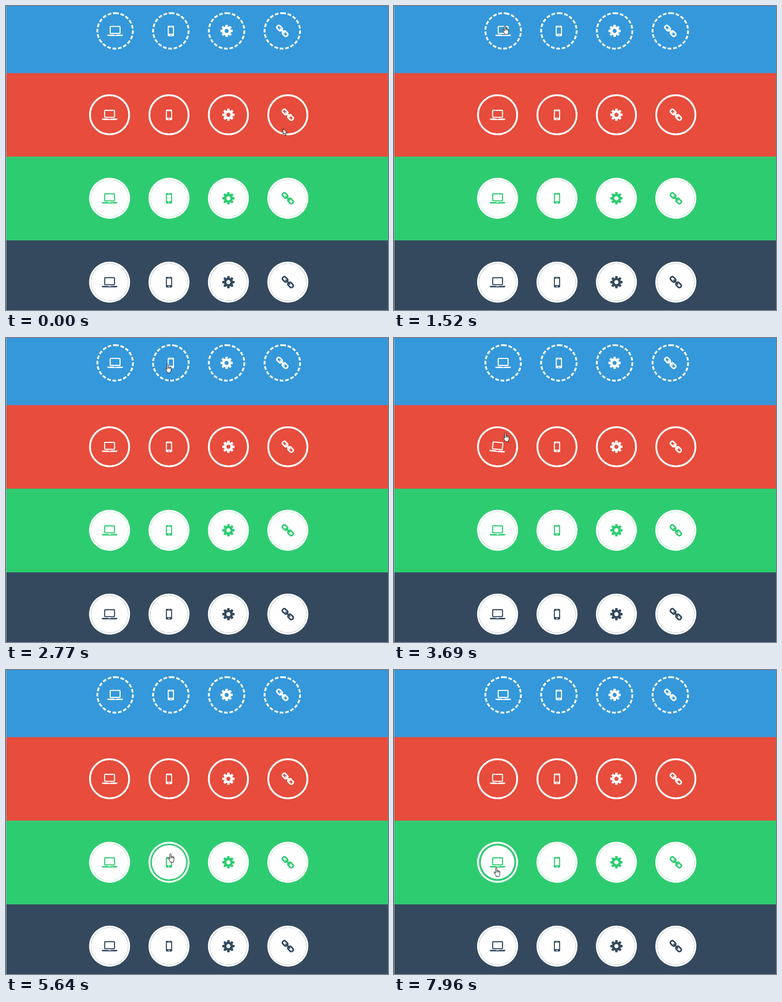
Animation, 839 px wide and 668 px high, one loop 7990 ms. Source, as an HTML page:

```html
<!DOCTYPE html>
<html lang="en">
<head>
<meta charset="utf-8">
<title>Icon hover effects</title>
<style>
  html, body { margin: 0; width: 100%; height: 100%; overflow: hidden; }
  svg { display: block; width: 100%; height: 100%; }
</style>
</head>
<body>
<svg id="stage" viewBox="0 0 839 668">
  <defs>
    <g id="laptop">
      <rect x="-10.8" y="-9.8" width="21.6" height="15.4" rx="1.6" fill="none" stroke="currentColor" stroke-width="2.4"/>
      <path d="M-17 8.2H-3.2L-2.4 9.2H2.4L3.2 8.2H17V9.6Q17 11.4 14.6 11.4H-14.6Q-17 11.4 -17 9.6Z" fill="currentColor"/>
    </g>
    <g id="phone">
      <path fill="currentColor" fill-rule="evenodd" d="M-4.8-11.5H4.8Q6.9-11.5 6.9-9.4V9.6Q6.9 11.8 4.8 11.8H-4.8Q-6.9 11.8-6.9 9.6V-9.4Q-6.9-11.5-4.8-11.5ZM-4.6-7.8V6.4H4.6V-7.8ZM-1.3 8.2V10.2H1.3V8.2ZM-2-10.1V-9.3H2V-10.1Z"/>
    </g>
    <g id="gear">
      <circle r="7.2" fill="none" stroke="currentColor" stroke-width="5.4"/>
    </g>
    <g id="link">
      <g transform="rotate(45)" fill="none" stroke="currentColor" stroke-width="3.4">
        <rect x="-14.9" y="-4.1" width="12.6" height="8.2" rx="3.2"/>
        <rect x="2.3" y="-4.1" width="12.6" height="8.2" rx="3.2"/>
        <path d="M-6 0H6" stroke-width="3.2" stroke-linecap="round"/>
      </g>
    </g>
  </defs>
  <g id="bands"></g>
  <g id="buttons"></g>
  <path d="M.5 0V668" stroke="#a8a8a8"/>
  <g id="arrow" fill="#fff" stroke="#000" stroke-linejoin="round">
    <path d="M.5 .5V13.2L3.4 10.6L5.3 15.2L7.4 14.3L5.5 9.9H9.6Z"/>
  </g>
  <g id="hand" fill="#fff" stroke="#000" stroke-linejoin="round">
    <path d="M-.8 12.5V2C-.8 0 2 0 2 2V7.5C2 6 4.4 6 4.4 7.8C4.4 6.4 6.6 6.6 6.6 8.4C6.6 7.2 8.5 7.4 8.5 9.3V13.5C8.5 15.5 7.3 16.5 7.3 19.5H.3C.3 17-1.5 15.5-2.5 14L-4.3 11.2C-5 9.8-3.2 9-2.2 10.3Z"/>
    <path d="M2 7.5V10.8M4.4 7.8V10.8M6.6 8.4V10.8" fill="none"/>
  </g>
</svg>
<script>
const LOOP = 7990, START = 300, SPIN = 360 / 9000, FADE = 200;
const $ = id => document.getElementById(id);

function add(parent, tag, attrs) {
  const el = document.createElementNS('http://www.w3.org/2000/svg', tag);
  for (const k in attrs) el.setAttribute(k, attrs[k]);
  return parent.appendChild(el);
}

const icons = ['laptop', 'phone', 'gear', 'link'];
const rows = [
  { top: 0, color: '#3498db', x: 239.7, gap: 122.4, y: 54.7, r: 41, kind: 'dashed' },
  { top: 147.5, color: '#e74c3c', x: 227.5, gap: 130.5, y: 239, r: 45, kind: 'ring' },
  { top: 331, color: '#2ecc71', x: 227.5, gap: 130.5, y: 422.5, r: 45, kind: 'disc' },
  { top: 515, color: '#34495e', x: 227.5, gap: 130.5, y: 606.8, r: 45, kind: 'disc' }
];

for (let a = 0; a < 360; a += 45)
  add($('gear'), 'rect', {
    x: -2.7, y: -13.4, width: 5.4, height: 5.4, rx: 0.8,
    fill: 'currentColor', transform: `rotate(${a})`
  });

// The moving part is the dashed ring, the whole button or the inner disc.
const builders = {
  dashed(g) {
    const part = add(g, 'g', {});
    add(part, 'circle', {
      r: 39, fill: 'none', stroke: '#fff', 'stroke-width': 4,
      'stroke-dasharray': '8 4', transform: 'rotate(-90)'
    });
    return part;
  },
  ring(g) {
    const part = add(g, 'g', {});
    add(part, 'circle', { r: 43, fill: 'none', stroke: '#fff', 'stroke-width': 4 });
    return part;
  },
  disc(g, color) {
    add(g, 'circle', { r: 45, fill: '#fff' });
    add(g, 'circle', { r: 41, fill: color });
    return add(g, 'circle', { r: 40.8, fill: '#fff' });
  }
};

const buttons = rows.flatMap(row => {
  add($('bands'), 'rect', { x: 0, y: row.top, width: 839, height: 668 - row.top, fill: row.color });
  return icons.map((icon, i) => {
    const x = row.x + i * row.gap;
    const g = add($('buttons'), 'g', { transform: `translate(${x} ${row.y})` });
    const part = builders[row.kind](g, row.color);
    add(row.kind === 'ring' ? part : g, 'use', {
      href: '#' + icon, color: row.kind === 'disc' ? row.color : '#fff'
    });
    return { x, y: row.y, r: row.r, kind: row.kind, part, visits: [] };
  });
});

// Pointer stops: time, x, y.
const path = [
  [300, 836, 75], [560, 620, 66], [800, 440, 62], [1040, 300, 58], [1140, 300, 58],
  [1520, 243, 43], [2000, 250, 52], [2350, 300, 60], [2770, 354, 57], [3150, 358, 72],
  [3350, 335, 100], [3530, 262, 201], [3690, 244, 208], [4100, 236, 228], [4430, 272, 238],
  [4560, 313, 240], [4860, 343, 239], [5200, 355, 252], [5350, 358, 284], [5500, 360, 378],
  [5880, 361, 414], [6790, 361, 414], [6820, 357, 415], [6850, 355, 414], [7000, 355, 414],
  [7250, 320, 418], [7450, 272, 414], [7700, 218, 404], [7850, 218, 404], [7960, 224, 434], [7990, 224, 434]
];

const still = (a, b) => a[1] === b[1] && a[2] === b[2];

function velocity(i, k) {
  const a = path[i - 1], b = path[i], c = path[i + 1];
  if (!a || !c || still(a, b) || still(b, c)) return 0;
  return (c[k] - a[k]) / (c[0] - a[0]);
}

function pointer(t) {
  const i = Math.max(0, path.findIndex((p, n) => n === path.length - 1 || t < path[n + 1][0]));
  const a = path[i], b = path[i + 1];
  if (!b) return [a[1], a[2]];
  const d = b[0] - a[0], s = (t - a[0]) / d, s2 = s * s, s3 = s2 * s;
  return [1, 2].map(k =>
    a[k] * (2 * s3 - 3 * s2 + 1) + b[k] * (3 * s2 - 2 * s3) +
    d * (velocity(i, k) * (s3 - 2 * s2 + s) + velocity(i + 1, k) * (s3 - s2)));
}

// Walk the pointer once to learn when each button is hovered.
for (let t = START; t < LOOP; t += 5) {
  const [x, y] = pointer(t);
  for (const b of buttons) {
    if (Math.hypot(x - b.x, y - b.y) > b.r) continue;
    const last = b.visits[b.visits.length - 1];
    if (last && last.end >= t) last.end = t + 5;
    else b.visits.push({ start: t, end: t + 5 });
  }
}

const ease = s => s * s * (3 - 2 * s);
const fade = dt => ease(Math.min(1, Math.max(0, dt / FADE)));

function pose(b, t) {
  const visit = b.visits.find(v => t >= v.start && t < v.end);
  if (b.kind === 'disc') {
    const shrink = b.visits.reduce((sum, v) => sum + fade(t - v.start) - fade(t - v.end), 0);
    b.part.setAttribute('r', 40.8 - 3.9 * shrink);
  } else {
    b.part.setAttribute('transform', `rotate(${visit ? (t - visit.start) * SPIN : 0})`);
  }
  return !!visit;
}

function place(id, shown, x, y) {
  $(id).setAttribute('display', shown ? 'inline' : 'none');
  $(id).setAttribute('transform', `translate(${x} ${y})`);
}

function draw(t) {
  const hovered = buttons.map(b => pose(b, t)).some(Boolean);
  const moving = t >= START;
  const [x, y] = moving ? pointer(t) : [608, 269];
  place('hand', hovered, x, y);
  place('arrow', !hovered && (moving || t < 150), x, y);
}

const begin = performance.now();
function tick() {
  draw((performance.now() - begin) % LOOP);
  requestAnimationFrame(tick);
}
tick();
</script>
</body>
</html>
```
